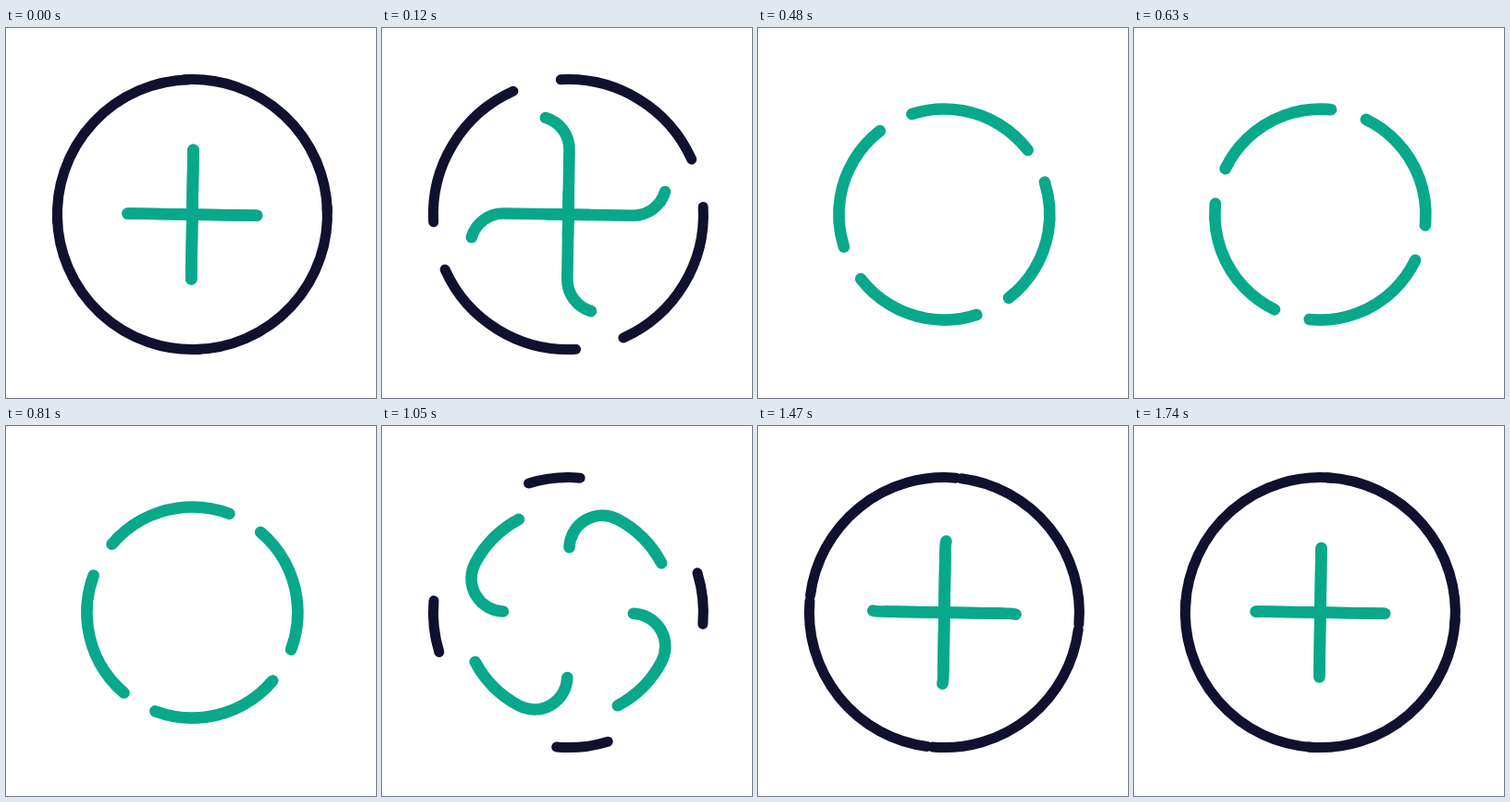
These frames come from a looping animation (400x400 px, 1860 ms). An HTML page:

```html
<!DOCTYPE html>
<html lang="en">
<head>
<meta charset="utf-8">
<title>Plus spinner</title>
<style>
  html, body { margin: 0; width: 100%; height: 100%; overflow: hidden; background: #fff; }
  svg { display: block; width: 100vw; height: 100vh; }
  path { fill: none; stroke-linecap: round; }
  #arm { stroke: #08a88a; stroke-width: 12.6; }
  #rim { stroke: #10112f; stroke-width: 11; }
</style>
</head>
<body>
<svg viewBox="0 0 400 400">
  <g transform="translate(201.4 201.6) rotate(0.9)">
    <g id="quarter">
      <path id="rim"/>
      <path id="arm"/>
    </g>
    <use href="#quarter" transform="rotate(90)"/>
    <use href="#quarter" transform="rotate(180)"/>
    <use href="#quarter" transform="rotate(270)"/>
  </g>
</svg>
<script>
const LOOP = 1860, STEP = 30, LAST = 1740;
const HALF = 69.8, RING = 114, RIM = 146, QUARTERS = 7;
const RIM_SPAN = 92, RIM_SHIFT = 4.1, RIM_RATE = 0.494;
const RAD = Math.PI / 180;

const arm = document.getElementById('arm');
const rim = document.getElementById('rim');

// Angles run counter-clockwise from straight up.
const polar = (r, a) => `${(-r * Math.sin(a)).toFixed(3)} ${(-r * Math.cos(a)).toFixed(3)}`;
const arcTo = (r, end) => `A${r} ${r} 0 0 0 ${end}`;

// Bend between an arm and the ring: a circle touching both.
const bend = (RING * RING - HALF * HALF) / (2 * RING);
const lean = Math.atan2(bend, HALF);
const turn = QUARTERS * Math.PI / 2;
const ringTurn = turn - 2 * lean;
const travel = 2 * HALF + 2 * bend * (Math.PI / 2 + lean) + ringTurn * RING;

function trackPath() {
  const parts = 12;
  let d = `M0 ${HALF}L0 ${-HALF}` + arcTo(bend, polar(RING, lean));
  for (let i = 1; i <= parts; i++) d += arcTo(RING, polar(RING, lean + ringTurn * i / parts));
  return d + arcTo(bend, polar(HALF, turn)) + 'L' + polar(HALF, turn + Math.PI);
}

// Time, distance along the track, speed.
const knots = [
  [0, 0, 0.27],
  [240, 124.3, 0.8],
  [480, 414, 1.62],
  [810, 1014, 1.62],
  [1050, travel - 141.6, 0.78],
  [1260, travel - 44.5, 0.26],
  [1620, travel - 1, 0.015],
  [LAST, travel, 0]
];

function distance(t) {
  let i = 0;
  while (i < knots.length - 2 && t > knots[i + 1][0]) i++;
  const [t0, p0, v0] = knots[i], [t1, p1, v1] = knots[i + 1];
  const w = t1 - t0, u = (t - t0) / w, n = 1 - u;
  return n * n * ((1 + 2 * u) * p0 + u * w * v0) + u * u * ((3 - 2 * u) * p1 - n * w * v1);
}

function rimPath(s) {
  const leaving = s < travel / 2;
  const span = RIM_SPAN - RIM_RATE * (leaving ? s : travel - s);
  if (span <= 0) return '';
  const from = leaving ? RIM_SHIFT - span : -RIM_SHIFT;
  return 'M' + polar(RIM, from * RAD) + arcTo(RIM, polar(RIM, (from + span) * RAD));
}

function draw(now) {
  const t = Math.min(LAST, Math.floor((now % LOOP) / STEP) * STEP);
  const s = distance(t);
  arm.setAttribute('stroke-dashoffset', -s);
  rim.setAttribute('d', rimPath(s));
}

arm.setAttribute('d', trackPath());
arm.setAttribute('stroke-dasharray', `${2 * HALF} 5000`);

const start = performance.now();
function tick() {
  draw(performance.now() - start);
  requestAnimationFrame(tick);
}
tick();
</script>
</body>
</html>
```
